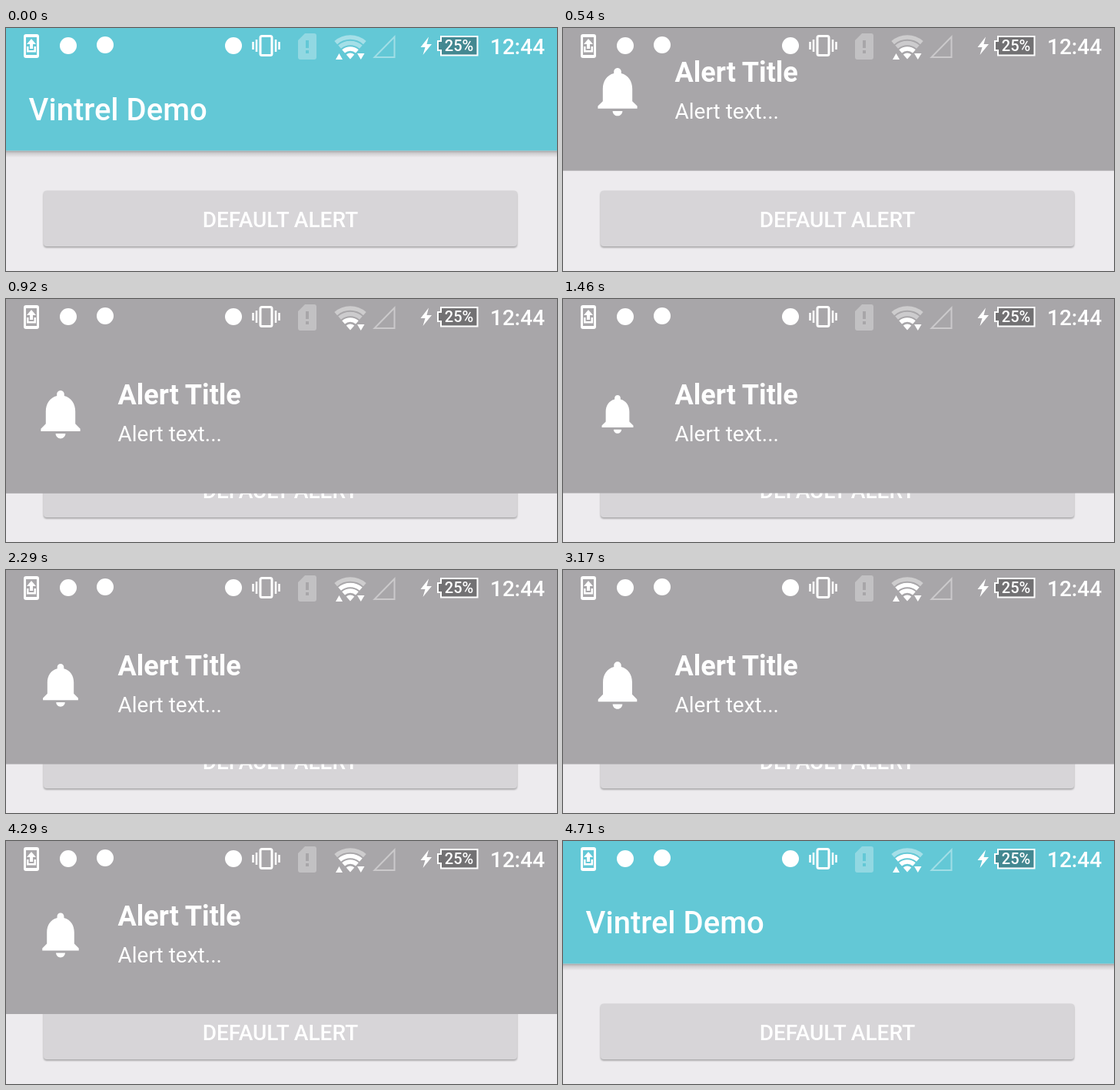
These frames come from a looping animation (717 px wide and 316 px high, 4.75 s). An HTML page:

```html
<!DOCTYPE html>
<html lang="en">
<head>
<meta charset="utf-8">
<title>Alert banner</title>
<style>
  html, body { margin: 0; width: 100%; height: 100%; overflow: hidden; background: #edebee; }
  svg { display: block; width: 100vw; height: 100vh; }
  text { font-family: Roboto, sans-serif; font-weight: 500; fill: #fff; }
</style>
</head>
<body>
<svg viewBox="0 0 717 316">
  <defs>
    <linearGradient id="shade" x2="0" y2="1">
      <stop offset="0" stop-opacity=".3"/>
      <stop offset=".4" stop-opacity=".12"/>
      <stop offset="1" stop-opacity="0"/>
    </linearGradient>
    <filter id="blur" x="-5%" y="-20%" width="110%" height="140%"><feGaussianBlur stdDeviation="1.3"/></filter>
  </defs>

  <rect width="717" height="316" fill="#edebee"/>
  <rect y="159.500" width="717" height="9" fill="url(#shade)"/>
  <rect width="717" height="159.500" fill="#63c8d6"/>
  <text x="29.5" y="119.5" font-size="40">Vintrel Demo</text>

  <rect x="49" y="213" width="616" height="72.500" rx="4" opacity=".33" filter="url(#blur)"/>
  <rect x="49" y="211.5" width="616" height="72.500" rx="4" fill="#d7d5d8"/>
  <text x="357" y="258.5" font-size="28" text-anchor="middle">DEFAULT ALERT</text>

  <g id="alert">
    <rect y="-64" width="717" height="316.5" fill="#a8a6a9"/>
    <path id="bell" fill="#fff" d="M12 22c1.1 0 2-.9 2-2h-4c0 1.1.9 2 2 2zm6-6v-5c0-3.07-1.64-5.64-4.5-6.32V4c0-.83-.67-1.5-1.5-1.5s-1.5.67-1.5 1.5v.68C7.63 5.36 6 7.92 6 11v5l-2 2v1h16v-1l-2-2z"/>
    <text x="145.5" y="137" font-size="36" style="font-weight:700">Alert Title</text>
    <text x="145.5" y="185" font-size="28" style="font-weight:400">Alert text...</text>
  </g>

  <!-- status bar -->
  <g fill="#fff">
    <path fill-rule="evenodd" d="M26 8h14q3 0 3 3v25q0 3-3 3H26q-3 0-3-3V11q0-3 3-3zM26 12v23h14V12z"/>
    <path d="M33 14l6 7h-4v6h-4v-6h-4zM27 24h2.5v5h7v-5H39v7.500H27z"/>
    <circle cx="81" cy="23" r="11"/>
    <circle cx="129" cy="22" r="11"/>
    <circle cx="296" cy="23" r="11"/>
    <rect x="331" y="10.500" width="15" height="25" rx="2" fill="none" stroke="#fff" stroke-width="3"/>
    <path d="M321.500 18v10M326 15v16M351 15v16M355.500 18v10" stroke="#fff" stroke-width="2.500"/>
    <path fill-rule="evenodd" opacity=".3" d="M389 7h12q3 0 3 3v28q0 3-3 3h-18q-3 0-3-3V16zM390 16v10h4V16zM390 29v4h4v-4z"/>
    <g id="wifi"></g>
    <path id="upload" d="M429 41l4.500-8 4.500 8z"/>
    <path d="M457 33h9.500l-4.750 8z"/>
    <path d="M505.500 11.500v26.500h-26z" fill="none" stroke="#fff" stroke-width="2" opacity=".4"/>
    <path d="M550 11.500l-10.500 13.500h6l-3 10 11.500-14h-6.500z"/>
    <path d="M566 11h47.500v24.500H566V29h-4V17h4z" fill="#000" fill-opacity=".32" stroke="#fff" stroke-width="2"/>
    <text x="589.500" y="30" font-size="20" text-anchor="middle">25%</text>
    <text x="630" y="34" font-size="28">12:44</text>
  </g>
</svg>
<script>
const LOOP = 4750, TRAVEL = 316, FAINT = 0.42;
const ENTER = { start: 432, span: 500 };
const EXIT = { start: 4018, span: 378 };
const PULSE = { start: 950, hold: 120, move: 390 };

const byId = id => document.getElementById(id);
const clamp = v => Math.min(1, Math.max(0, v));
const progress = (t, { start, span }) => clamp((t - start) / span);
const overshoot = p => (p - 1) ** 2 * (3 * (p - 1) + 2) + 1;
const anticipate = p => p * p * (3 * p - 2);

// Signal fan, outermost band first
const bands = [28.5, 21, 13.5, 4].map((r, i) => {
  const dx = r * Math.sin(0.72), y = 40.5 - r * Math.cos(0.72);
  const arc = document.createElementNS("http://www.w3.org/2000/svg", "path");
  arc.setAttribute("d", `M${448 - dx} ${y}A${r} ${r} 0 0 1 ${448 + dx} ${y}`);
  arc.setAttribute("fill", "none");
  arc.setAttribute("stroke", "#fff");
  arc.setAttribute("stroke-width", i < 3 ? 5.6 : 8);
  arc.setAttribute("opacity", i ? 1 : FAINT);
  byId("wifi").append(arc);
  return arc;
});

function bellScale(t) {
  const elapsed = t - PULSE.start;
  if (elapsed < 0) return 1;
  const period = PULSE.hold + PULSE.move;
  const swing = 0.1 * Math.cos(Math.PI * clamp((elapsed % period - PULSE.hold) / PULSE.move));
  return 0.9 + (Math.floor(elapsed / period) % 2 ? -swing : swing);
}

function draw(t) {
  const y = TRAVEL * (overshoot(progress(t, ENTER)) - 1 - anticipate(progress(t, EXIT)));
  byId("alert").setAttribute("transform", `translate(0 ${y})`);
  byId("bell").setAttribute("transform", `translate(71 149.2) scale(${3.2 * bellScale(t)}) translate(-12 -12)`);

  const weak = t < 1920;
  const idle = (t >= 580 && t < 1580) || (t >= 4500 && t < 4710);
  bands[1].setAttribute("opacity", weak ? FAINT : 1);
  byId("upload").setAttribute("visibility", idle ? "hidden" : "visible");
}

const origin = performance.now();
function tick() {
  draw((performance.now() - origin) % LOOP);
  requestAnimationFrame(tick);
}
tick();
</script>
</body>
</html>
```
